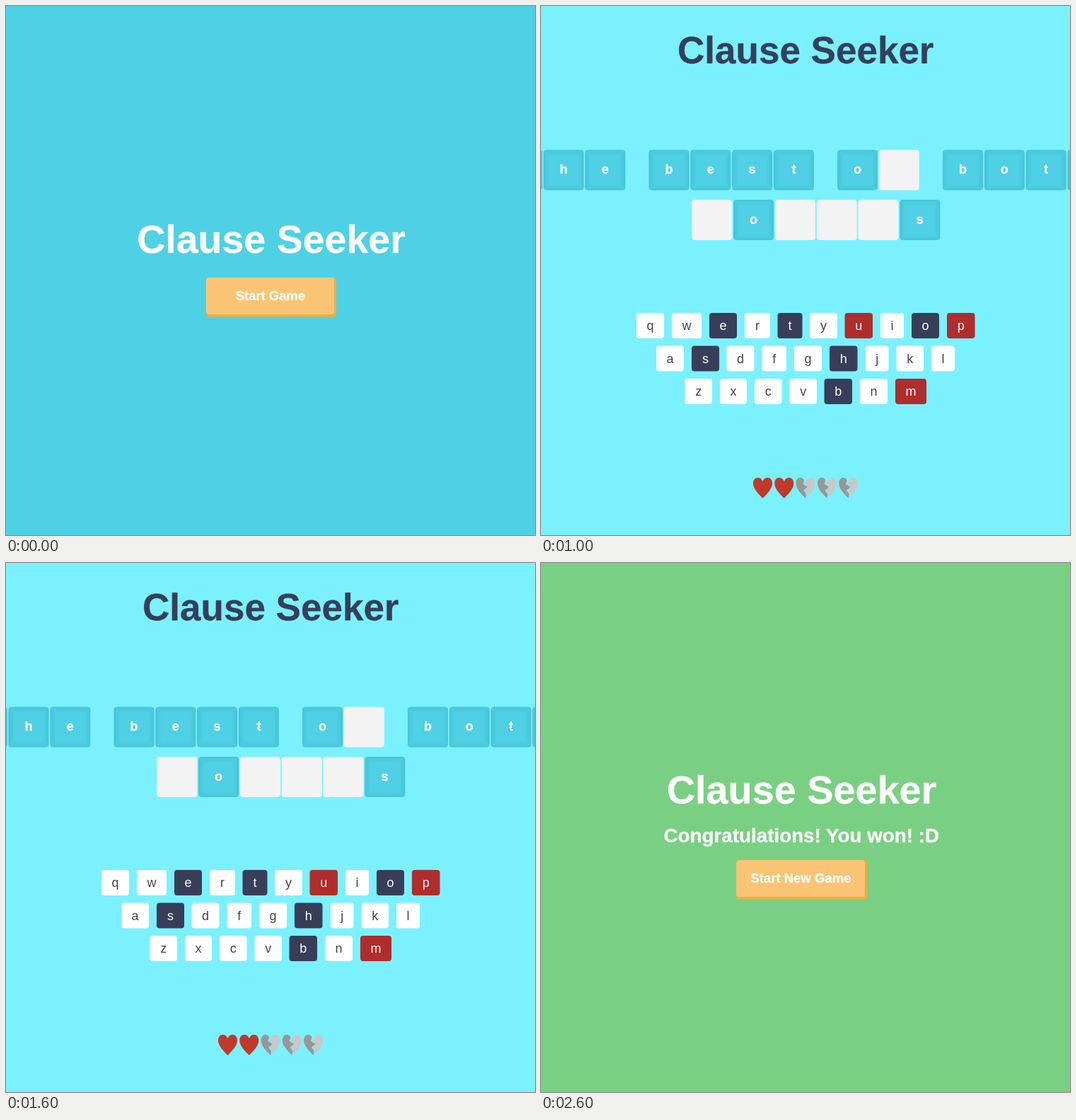
Write an HTML page that moves like this. It is 748 by 748 pixels and loops after 3 s.

```html
<!DOCTYPE html>
<html lang="en">
<head>
<meta charset="utf-8">
<title>Clause Seeker</title>
<style>
html, body { margin: 0; width: 100%; height: 100%; overflow: hidden; }
svg { display: block; width: 100vw; height: 100vh; }
text { font-family: "Liberation Sans", Arial, sans-serif; text-anchor: middle; }
.bold { font-weight: bold; stroke-width: 0.3px; }
</style>
</head>
<body>
<svg id="stage" viewBox="0 0 748 748" xmlns="http://www.w3.org/2000/svg"></svg>
<script>
const stage = document.getElementById("stage");
const TITLE = "Clause Seeker";
const NAVY = "#383e58", RED = "#af2d2c", TEAL = "#4fd0e4";

function add(parent, tag, attrs, content) {
  const el = document.createElementNS("http://www.w3.org/2000/svg", tag);
  for (const key in attrs) el.setAttribute(key, attrs[key]);
  if (content) el.textContent = content;
  parent.appendChild(el);
  return el;
}

function rect(parent, x, y, width, height, fill, rx = 0) {
  return add(parent, "rect", { x, y, width, height, fill, rx });
}

function label(parent, str, x, y, size, fill = "#fff", bold = true) {
  const look = bold ? { class: "bold", stroke: fill } : {};
  add(parent, "text", { x, y, "font-size": size, fill, ...look }, str);
}

function scene(color) {
  const g = add(stage, "g", { visibility: "hidden" });
  rect(g, 0, 0, 748, 748, color);
  return g;
}

function button(parent, str, x, y, w, h, size) {
  rect(parent, x, y, w, h, "#f0ad3e", 4);
  rect(parent, x, y, w - 3, h - 3.5, "#f9c574", 4);
  label(parent, str, x + w / 2 - 1.1, y + 32, size);
}

// Letter tile: shown tiles have a soft dark inner edge, hidden ones are blank
function tile(parent, x, y, ch) {
  rect(parent, x, y, 57, 57, ch === "_" ? "#f3f3f3" : TEAL, 4);
  if (ch === "_") return;
  for (let i = 0; i < 8; i++) {
    add(parent, "rect", {
      x: x + i + 0.5, y: y + i + 0.5, width: 56 - 2 * i, height: 56 - 2 * i, rx: 4,
      fill: "none", stroke: "#1d7f96", "stroke-opacity": 0.15 * (1 - i / 8) ** 1.5
    });
  }
  label(parent, ch, x + 28.5, y + 33.5, 18);
}

function word(parent, x, y, letters) {
  [...letters].forEach((ch, i) => tile(parent, x + i * 58.8, y, ch));
}

function keyRow(parent, y, letters, starts, widths) {
  [...letters].forEach((ch, i) => {
    const fill = "etoshb".includes(ch) ? NAVY : "upm".includes(ch) ? RED : "#fff";
    rect(parent, starts[i], y, widths[i], 36, fill, 4);
    label(parent, ch, starts[i] + widths[i] / 2, y + 24, 18,
      fill === "#fff" ? "#444" : "#fff", false);
  });
}

function heart(parent, x, full) {
  const g = add(parent, "g", { transform: `translate(${x} 667)` });
  const path = (d, fill) => add(g, "path", { d, fill });
  if (full) {
    path("M0 5C-2 1-4 0-7 0C-11 0-13.5 3.5-13.5 8C-13.5 16-6 23 0 29C6 23 13.5 16 13.5 8C13.5 3.5 11 0 7 0C4 0 2 1 0 5Z", "#c0392b");
    return;
  }
  path("M-2 4C-3 1-5 0-7.5 0C-11 0-13.5 3.5-13.5 8C-13.5 16-6 23 0 29L1 23L-3 18L3 13L-4 9Z", "#979797");
  path("M1 4C2 1 5 0 7.5 0C11 0 13.5 3.5 13.5 8C13.5 16 7 23 1.5 28L2.5 23L-1.5 18L4.5 13L-2.5 8.5Z", "#c8c8c8");
}

const start = scene("#4ed1e4");
label(start, TITLE, 375, 349, 55.5);
button(start, "Start Game", 283, 384, 184, 55.5, 18.4);

const game = scene("#7bf1ff");
label(game, TITLE, 374.3, 80.5, 53, "#353f59");
word(game, -55.3, 203.5, "the");
word(game, 152.5, 203.5, "best");
word(game, 419, 203.5, "o_");
word(game, 568, 203.5, "both");
word(game, 213.3, 274, "_o___s");
keyRow(game, 434, "qwertyuiop",
  [135, 185, 238, 288, 334.5, 380, 429.5, 480, 524, 574],
  [39, 42, 39, 36, 35, 39, 39.5, 33, 39, 39.5]);
keyRow(game, 480.5, "asdfghjkl",
  [163, 213, 262.5, 312.5, 358, 408, 459, 502.5, 552],
  [39, 39, 39, 34.5, 39, 39.5, 32.5, 38.5, 33]);
keyRow(game, 527, "zxcvbnm",
  [203.5, 253, 302, 351.5, 400.5, 451, 501],
  [38.5, 38, 38.5, 38.5, 39.5, 39, 44]);
for (let i = 0; i < 5; i++) heart(game, 313.5 + i * 30.3, i < 2);

const won = scene("#79d082");
label(won, TITLE, 368.5, 339.5, 55.8);
label(won, "Congratulations! You won! :D", 368.3, 395, 27.8);
button(won, "Start New Game", 276, 420, 185, 55.5, 18.55);

const scenes = [start, game, won];

function draw(ms) {
  const now = Math.floor(ms / 1000) % 3;
  scenes.forEach((g, i) => g.setAttribute("visibility", i === now ? "visible" : "hidden"));
}

const t0 = performance.now();
function tick() {
  draw(performance.now() - t0);
  requestAnimationFrame(tick);
}
tick();
</script>
</body>
</html>
```
